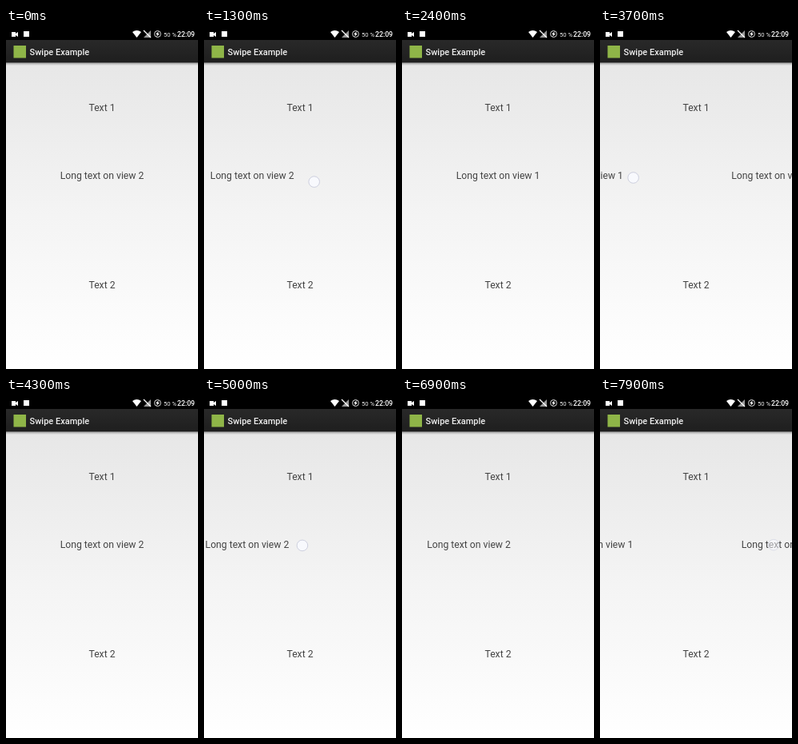
Recreate the animation shown at these times as an HTML page with a canvas. Size 240x427 px, loop 8000 ms.

```html
<!DOCTYPE html>
<html lang="en">
<head>
<meta charset="utf-8">
<title>Swipe Example</title>
<style>
  html, body { margin: 0; width: 100%; height: 100%; overflow: hidden; background: #fff; }
  canvas { display: block; }
</style>
</head>
<body>
<canvas id="stage" width="240" height="427"></canvas>
<script>
const ctx = document.getElementById('stage').getContext('2d');
const WIDTH = 240, HEIGHT = 427, LOOP = 8000;
const SLOP = 14, SETTLE = 600;

const swipes = [
  { start: 500, release: 1850, from: [211.5, 186], to: [66, 199] },
  { start: 2900, release: 3750, from: [199, 181], to: [29, 188] },
  { start: 4500, release: 5430, from: [203, 181], to: [24, 192] },
  { start: 6100, release: 6700, from: [60, 186], to: [190, 178] },
  { start: 7300, release: LOOP, from: [94, 188], to: [244, 184.5], faint: true }
];

const accelerate = k => k ** 1.3;
const mix = (a, b, k) => a + (b - a) * k;

function stateAt(t) {
  let view = 2, offset = 0, finger = null, faint = false;
  for (const { start, release, from, to, faint: light } of swipes) {
    if (t < start) break;
    const k = accelerate(Math.min(1, (t - start) / (release - start)));
    const point = from.map((value, axis) => mix(value, to[axis], k));
    const dir = Math.sign(to[0] - from[0]);
    const drag = dir * Math.max(0, Math.abs(point[0] - from[0]) - SLOP);
    if (t < release) {
      offset = drag;
      finger = point;
      faint = light;
    } else {
      const left = 1 - Math.min(1, (t - release) / SETTLE);
      view = 3 - view;
      offset = (drag - dir * WIDTH) * left ** 3;
      finger = null;
    }
  }
  return { view, offset, finger, faint };
}

function text(str, x, y, size, color, align = 'left', weight = 400) {
  ctx.font = `${weight} ${size}px Roboto, sans-serif`;
  ctx.textAlign = align;
  ctx.fillStyle = color;
  ctx.fillText(str, x, y);
}

function rect(x, y, w, h, fill) {
  ctx.fillStyle = fill;
  ctx.fillRect(x, y, w, h);
}

function shape(d, fill, stroke, width = 1) {
  const path = new Path2D(d);
  if (fill) { ctx.fillStyle = fill; ctx.fill(path); }
  if (stroke) { ctx.strokeStyle = stroke; ctx.lineWidth = width; ctx.stroke(path); }
}

function circle(x, y, r, fill, stroke, width) {
  ctx.beginPath();
  ctx.arc(x, y, r, 0, Math.PI * 2);
  if (fill) { ctx.fillStyle = fill; ctx.fill(); }
  ctx.strokeStyle = stroke;
  ctx.lineWidth = width;
  ctx.stroke();
}

function vertical(y0, y1, ...colors) {
  const gradient = ctx.createLinearGradient(0, y0, 0, y1);
  colors.forEach((c, i) => gradient.addColorStop(i / (colors.length - 1), c));
  return gradient;
}

function drawStatusBar() {
  rect(0, 0, WIDTH, 15, '#000');
  shape('M7 5h5v2l3-2v6l-3-2v2H7z', '#fff');
  rect(22, 4, 7, 7, '#fff');
  shape('M158 5Q163.5 1 169 5L163.5 12z', '#fff');
  shape('M181 3V12H172z', '#999');
  shape('M172 3L181 12', null, '#fff', 1.2);
  circle(189.5, 7.5, 4, null, '#ddd', 1);
  shape('M191 4L187 8H189L188 11L192 7H190z', '#fff');
  text('50 %', 197, 11, 7.7, '#eee');
  text('22:09', 214, 11, 8.7, '#fff', 'left', 500);
}

function drawActionBar() {
  rect(0, 15, WIDTH, 28.5, vertical(15, 44, '#292929', '#1e1e1e'));
  rect(0, 43.5, WIDTH, 3.5, vertical(43, 47, 'rgba(0,0,0,.35)', 'rgba(0,0,0,0)'));
  rect(9.5, 22, 15.5, 15.5, '#8fb548');
  text('Swipe Example', 29.5, 33.6, 11, '#eee', 'left', 500);
}

function draw(t) {
  const { view, offset, finger, faint } = stateAt(t);
  rect(0, 0, WIDTH, HEIGHT, vertical(44, HEIGHT, '#e7e7e7', '#f4f4f4', '#fff'));
  drawStatusBar();
  drawActionBar();

  const label = (str, x, y) => text(str, x, y, 12.2, '#444', 'center');
  label('Text 1', 120, 104);
  label('Text 2', 120, 326);
  for (const side of [-1, 0, 1]) {
    label(`Long text on view ${side ? 3 - view : view}`, 120 + offset + side * WIDTH, 189);
  }

  if (finger) {
    ctx.globalAlpha = faint ? 0.5 : 0.85;
    circle(...finger, 6.8, '#f9faff', '#b9bdd2', 0.8);
    ctx.globalAlpha = 1;
  }
}

function tick() {
  draw(performance.now() % LOOP);
  requestAnimationFrame(tick);
}
tick();
</script>
</body>
</html>
```
